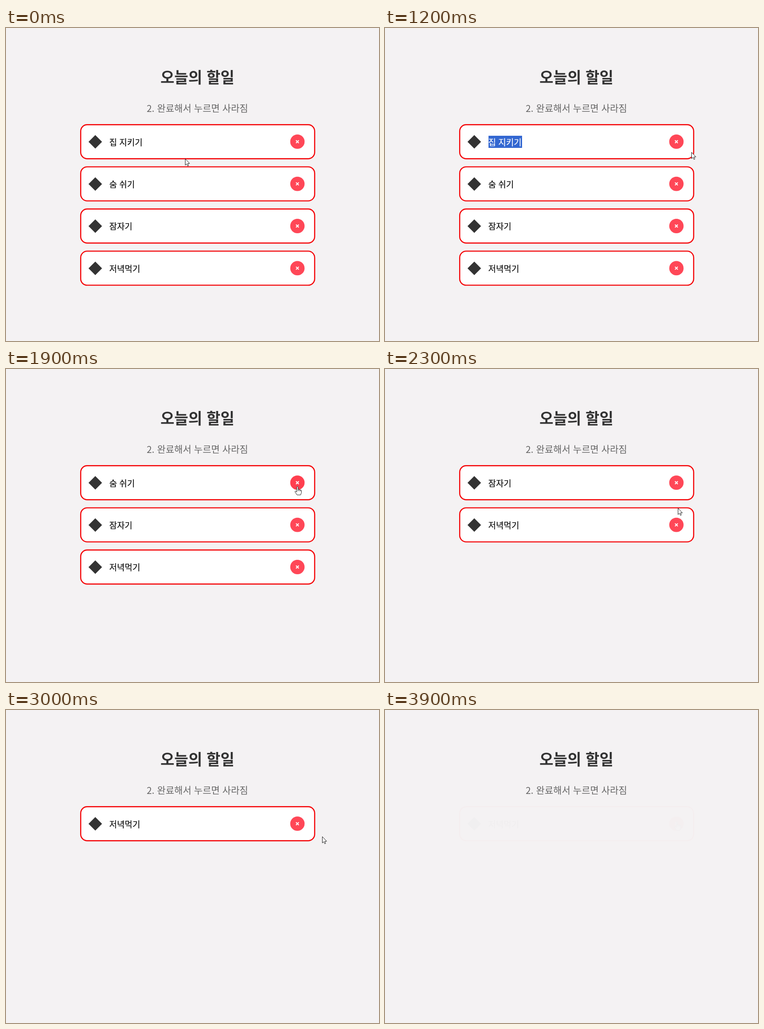
An HTML page for the animation above (4500 ms loop, 800 px wide and 671 px high).

```html
<!DOCTYPE html>
<html lang="ko">
<head>
<meta charset="utf-8">
<style>
  html, body { margin: 0; width: 100%; height: 100%; overflow: hidden; background: #f4f2f3; }
  svg { display: block; }
  text { font-family: "Noto Sans CJK KR", "Noto Sans CJK JP", "Noto Sans CJK SC", sans-serif; }
  .title { font-size: 32.5px; font-weight: 700; fill: #333; text-anchor: middle; }
  .hint { font-size: 20px; fill: #666; text-anchor: middle; }
  .label { font-size: 18px; font-weight: 500; fill: #0b0b0b; stroke: #0b0b0b; stroke-width: .2px; }
  .selected .label { fill: #fff; stroke: #fff; }
  .mark { fill: #3367d1; visibility: hidden; }
  .selected .mark { visibility: visible; }
  .button { fill: #ff4757; }
  .hover .button { fill: #ff3f4f; }
  .cursor { fill: #fff; stroke: #222; stroke-width: 1; stroke-linejoin: round; }
</style>
</head>
<body>
<svg width="800" height="671" viewBox="0 0 800 671">
  <text class="title" x="410.5" y="117.5">오늘의 할일</text>
  <text class="hint" x="410.5" y="179.5">2. 완료해서 누르면 사라짐</text>
  <g id="scene">
    <g id="list"></g>
    <g id="cursor" class="cursor">
      <path id="arrow" d="M.5 .5V14L3.5 11.2 5.6 15.8 7.7 14.9 5.7 10.4H9.8Z"/>
      <path id="beam" fill="none" d="M-2.5 -6.5H-.8L0 -5.7 .8 -6.5H2.5M0 -5.7V5.7M-2.5 6.5H-.8L0 5.7 .8 6.5H2.5"/>
      <path id="hand" d="M-1.4 .8Q0 -1.4 1.4 .8V6Q3 5 4 6.6 5.6 5.8 6.4 7.4 8.4 6.8 8.5 9V13.4L6.8 18H-.8L-5 11.6Q-5.4 9.2 -3.3 9.8L-1.4 11.8ZM1.4 6V9.5M4 6.6V9.8M6.4 7.4V10"/>
    </g>
  </g>
</svg>
<script>
const LOOP = 4500, STEP = 100, ROW_PITCH = 90.4;
const SELECT_AT = 800, FADE_AT = 3400, FADE_END = 3900;

// Each item disappears at its time and the rest move up at once.
const items = [
  { label: "집 지키기", gone: 1700 },
  { label: "숨 쉬기", gone: 2100 },
  { label: "잠자기", gone: 2600 },
  { label: "저녁먹기", gone: Infinity }
];

// time, x, y, cursor shape
const path = [
  [0, 384, 280, "arrow"], [300, 304, 261, "arrow"], [400, 283, 256, "beam"],
  [500, 269, 253, "beam"], [600, 224, 247, "beam"], [700, 224, 247, "beam"],
  [800, 300, 246, "beam"], [1000, 640, 258, "beam"], [1100, 690, 264, "arrow"],
  [1200, 657, 266, "arrow"], [1400, 632, 256, "hand"], [1500, 625, 252, "hand"],
  [2100, 625, 252, "hand"], [2200, 627, 275, "arrow"], [2300, 628, 298, "arrow"],
  [2400, 627, 275, "arrow"], [2500, 625, 252, "hand"], [2700, 625, 252, "hand"],
  [2800, 650, 262, "arrow"], [3000, 678, 271, "arrow"], [3100, 690, 280, "arrow"],
  [3200, 626, 240, "hand"]
];

const $ = id => document.getElementById(id);

$("list").innerHTML = items.map(({ label }) => `
  <g>
    <rect x="160.2" y="207.2" width="501.8" height="73" rx="14" fill="#fff" stroke="#f40508" stroke-width="2.4"/>
    <path d="M191.5 229.5L206 244 191.5 258.5 177 244Z" fill="#333"/>
    <rect class="mark" x="222" y="231" width="72" height="26"/>
    <text class="label" x="221.5" y="251.5">${label}</text>
    <circle class="button" cx="625" cy="243.7" r="15.4"/>
    <path d="M622 240.7l6 6m0-6l-6 6" stroke="#fff" stroke-width="2"/>
  </g>`).join("");
const rows = [...$("list").children];

function cursorAt(t) {
  const i = path.findLastIndex(key => key[0] <= t);
  const [t0, x0, y0, shape] = path[i];
  const [t1, x1, y1] = path[i + 1] || [LOOP, x0, y0];
  const k = (t - t0) / (t1 - t0);
  return { x: x0 + (x1 - x0) * k, y: y0 + (y1 - y0) * k, shape };
}

function draw(t) {
  const { x, y, shape } = cursorAt(t);
  let slot = 0;
  rows.forEach((row, i) => {
    const shown = t < items[i].gone;
    row.style.display = shown ? "" : "none";
    if (!shown) return;
    row.setAttribute("transform", `translate(0 ${slot * ROW_PITCH})`);
    row.classList.toggle("hover", slot === 0 && shape === "hand");
    row.classList.toggle("selected", i === 0 && t >= SELECT_AT);
    slot++;
  });
  $("cursor").setAttribute("transform", `translate(${x} ${y})`);
  for (const id of ["arrow", "beam", "hand"]) $(id).style.display = id === shape ? "" : "none";

  const fade = (t - FADE_AT + STEP) / (FADE_END - FADE_AT + STEP);
  $("scene").style.opacity = Math.min(1, Math.max(0.012, 1 - fade));
}

function tick(now) {
  draw(Math.floor(now % LOOP / STEP) * STEP);
  requestAnimationFrame(tick);
}
tick(performance.now());
</script>
</body>
</html>
```
